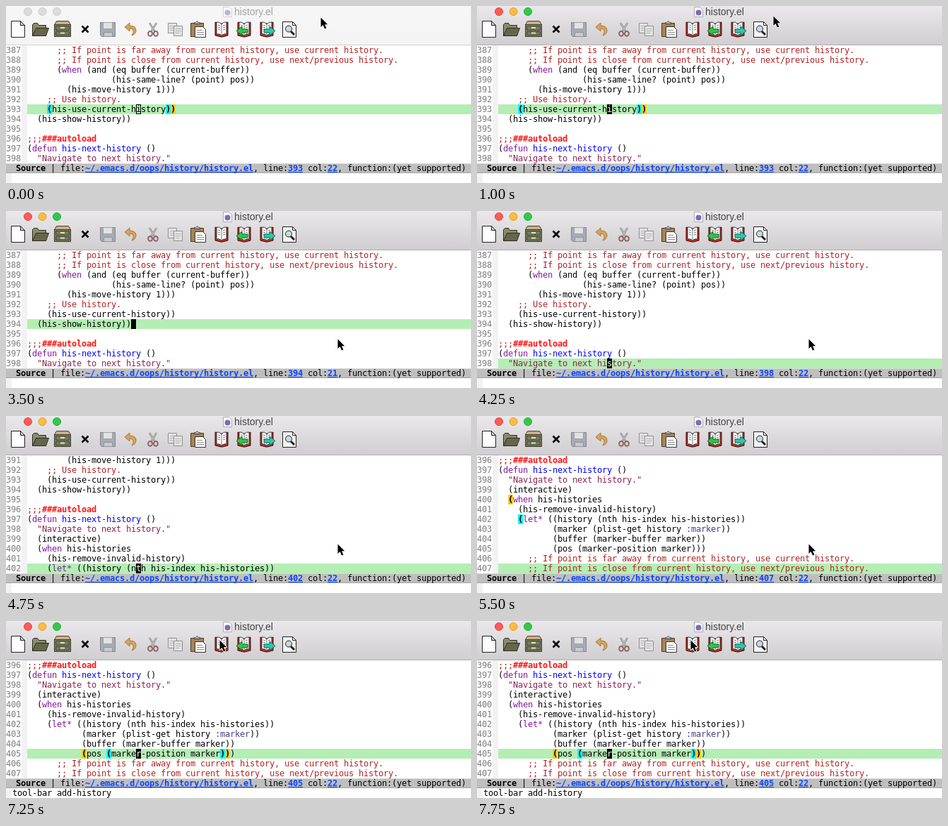
An HTML page with a canvas for the animation above (8000 ms loop, 658 by 252 pixels).

```html
<!DOCTYPE html>
<html lang="en">
<head>
<meta charset="utf-8">
<title>history.el</title>
<style>
html, body { margin: 0; width: 100%; height: 100%; overflow: hidden; background: #fff; }
canvas { display: block; }
</style>
</head>
<body>
<canvas id="stage" width="658" height="252"></canvas>
<script>
const c = document.getElementById('stage').getContext('2d');
const STEP = 250, LOOP = 8000, CELL = 7, ROW = 14, TOP = 56, LEFT = 30, ROWS = 12;
const MONO = '"DejaVu Sans Mono", monospace';
const CYAN = '#00ffff', GOLD = '#ffcc1a', GREEN = '#b4eeb4';

const far = '      ;; If point is far away from current history, use current history.';
const near = '      ;; If point is close from current history, use next/previous history.';
const FIRST = 387;
const code = [
  far, near,
  '      (when (and (eq buffer (current-buffer))',
  '                 (his-same-line? (point) pos))',
  '        (his-move-history 1)))',
  '    ;; Use history.',
  '    (his-use-current-history))',
  '  (his-show-history))',
  '',
  ';;;###autoload',
  '(defun his-next-history ()',
  '  "Navigate to next history."',
  '  (interactive)',
  '  (when his-histories',
  '    (his-remove-invalid-history)',
  '    (let* ((history (nth his-index his-histories))',
  '           (marker (plist-get history :marker))',
  '           (buffer (marker-buffer marker))',
  '           (pos (marker-position marker)))',
  far, near
];

// Syntax rules: pattern, colour, bold
const rules = [
  [/###autoload/g, '#ff1414', true],
  [/;;;|;; .*/g, '#b22222'],
  [/".*"/g, '#8b2252'],
  [/defun|when|let\*/g, '#86189c'],
  [/his-next-history/g, '#0000ff'],
  [/:marker/g, '#483d8b']
];

// Keyed by step number; each value holds until the next key
const mouse = { 0: [445, 16], 1: [431, 21], 2: [419, 14], 5: [404, 18], 6: [366, 29],
  7: [318, 39], 8: [295, 40], 11: [386, 112], 12: [469, 182], 26: [430, 148],
  27: [345, 66], 28: [302, 27] };
const point = { 0: 393, 14: 394, 15: 395, 16: 396, 17: 398, 18: 400, 19: 402,
  20: 404, 21: 406, 22: 407, 24: 406, 25: 405 };
const parens = {
  0: [[393, 4, CYAN], [393, 28, CYAN], [393, 29, GOLD]],
  14: [],
  22: [[400, 2, GOLD], [402, 4, CYAN]],
  25: [[405, 11, GOLD], [405, 16, CYAN], [405, 39, CYAN], [405, 40, GOLD]]
};
const at = (keys, k) => keys[Math.max(...Object.keys(keys).filter(n => n <= k))];

function rect(x, y, w, h, fill) {
  c.fillStyle = fill;
  c.fillRect(x, y, w, h);
}

function text(s, x, y, color, bold) {
  c.font = (bold ? 'bold ' : '') + '12px ' + MONO;
  c.fillStyle = color;
  [...s].forEach((ch, i) => c.fillText(ch, x + i * CELL, y));
}

function shape(d, fill, stroke, width = 1) {
  const p = new Path2D(d);
  if (fill) { c.fillStyle = fill; c.fill(p); }
  if (stroke) { c.strokeStyle = stroke; c.lineWidth = width; c.stroke(p); }
}

function disc(x, y, r, fill, stroke) {
  c.beginPath();
  c.arc(x, y, r, 0, 7);
  c.fillStyle = fill;
  c.fill();
  if (stroke) { c.strokeStyle = stroke; c.lineWidth = 1; c.stroke(); }
}

function book() {
  shape('M-9-10L-1-8L1-8L9-10V9L1 11H-1L-9 9Z', '#c92b22', '#3a0b08');
  shape('M-7-10Q-3-11 0-7Q3-11 7-10V7Q3 6 0 9Q-3 6-7 7Z', '#fff', '#333');
  shape('M0-7V9M-5-6L-2-5M-5-3L-2-2M-5 0L-2 1M5-6L2-5M5-3L2-2M5 0L2 1', null, '#777');
}

// Toolbar drawings, each centred on its own origin
const icons = [
  [17, () => {
    shape('M-9.5-11.5H3.5L9.5-5.5V11.5H-9.5Z', '#fdfdfd', '#222');
    shape('M3.5-11.5V-5.5H9.5Z', '#ccc', '#222');
  }],
  [48, () => {
    shape('M-10.5 9.5V-6.5L-8.5-8.5H-3.5L-1.5-5.5H8.5V9.5Z', '#8b8a6b', '#2e2d20');
    shape('M-10.5 9.5L-5.5-1.5H12.5L8.5 9.5Z', '#66664d', '#2e2d20');
  }],
  [80, () => {
    shape('M-11.5-6.5L-8.5-11.5H8.5L11.5-6.5Z', '#c9b08b', '#4a3c28');
    shape('M-11.5-6.5H11.5V10.5H-11.5Z', '#8a8a6c', '#37372a');
    shape('M-9.5-4.5H9.5V1.5H-9.5ZM-9.5 3.5H9.5V8.5H-9.5Z', '#717a5d', '#41452f');
    shape('M-3-2H3M-3 5.5H3', null, '#e6dfb8', 2);
  }],
  [112, () => shape('M-4.5-4.5L4.5 4.5M4.5-4.5L-4.5 4.5', null, '#000', 2.6)],
  [144, () => {
    shape('M-10.5-9.5H10.5V10.5H-8.5L-10.5 8.5Z', '#a6abb6', '#85878d');
    shape('M-6.5-9.5H6.5V-.5H-6.5Z', '#e2e2e4', '#a0a0a4');
    shape('M-5.5 4.5H6.5V10.5H-5.5Z', '#c9cacd', '#909298');
  }],
  [176, () => shape('M-8-3L-1-9V-5Q8-5 8 2Q8 7 2 9Q5 5 4 2Q3-1-1-1V3Z', '#d5a361', '#a67839')],
  [208, () => {
    shape('M-5-9L3 4M5-9L-3 4', null, '#858585', 2.4);
    shape('M-5-9L3 4M5-9L-3 4', null, '#d2d2d2');
    shape('M-4 3A3 3.4 0 1 0-3.9 3M4 3A3 3.4 0 1 1 3.9 3', null, '#8d6262', 2);
  }],
  [240, () => {
    for (const [x, y] of [[-10.5, -8.5], [-2.5, -4.5]]) {
      shape(`M${x} ${y}h12v14h-12z`, '#e4e4e4', '#909090');
      shape(`M${x + 2} ${y + 4}h8m-8 3h8m-8 3h6`, null, '#b2b2b2');
    }
  }],
  [272, () => {
    shape('M-10.5-8.5H7.5V10.5H-10.5Z', '#a88355', '#493822');
    shape('M-5.5-7.5V-9.5H-3.5L-1.5-11.5L.5-9.5H2.5V-7.5Z', '#bbb', '#444');
    shape('M-4.5-3.5H6.5L10.5 .5V11.5H-4.5Z', '#fff', '#333');
    shape('M-2 1.5H6M-2 4.5H8M-2 7.5H8', null, '#888');
  }],
  [305, book],
  [337, () => {
    book();
    shape('M-11 2.5L-3-4V0H5V5H-3V9Z', '#2fc54a', '#0c6420');
  }],
  [369, () => {
    book();
    shape('M12 2.5L4-4V0H-4V5H4V9Z', '#2fc8a8', '#0a655d');
  }],
  [401, () => {
    shape('M-9.5-10.5H4.5L9.5-5.5V11.5H-9.5Z', '#f4f4f4', '#222');
    shape('M4.5-10.5V-5.5H9.5', null, '#222');
    shape('M2 3L7 8', null, '#222', 3);
    disc(-1, -.5, 4.5, '#c8d8df', '#222');
  }]
];

function header(active) {
  const g = c.createLinearGradient(0, 0, 0, 55);
  g.addColorStop(0, active ? '#eae8ea' : '#f6f6f6');
  g.addColorStop(1, active ? '#d0ced0' : '#f4f4f4');
  rect(0, 0, 658, 55, g);
  rect(0, 55, 658, 1, active ? '#b0aeb0' : '#d2d2d2');

  const lights = active
    ? [['#fc5b57', '#df4744'], ['#fdbc40', '#de9f34'], ['#34c84a', '#27aa35']]
    : Array(3).fill(['#dcdcdc', '#cbcbcb']);
  lights.forEach(([fill, edge], i) => disc(31 + i * 20.5, 8, 5.5, fill, edge));

  c.globalAlpha = active ? 1 : .5;
  shape('M307.5 1.5H315.5L319.5 5.5V15.5H307.5Z', '#fff', '#aaa');
  disc(313.5, 9.5, 4, '#7d6bb8');
  c.globalAlpha = 1;
  c.font = '14px "Liberation Sans", Arial, sans-serif';
  c.fillStyle = active ? '#444' : '#a2a2a2';
  c.fillText('history.el', 323, 13);

  for (const [x, draw] of icons) {
    c.save();
    c.translate(x, 33);
    draw();
    c.restore();
  }
}

function codeLine(s, y) {
  const colors = Array(s.length).fill('#000'), bold = [];
  for (const [re, color, heavy] of rules)
    for (const m of s.matchAll(re))
      for (let i = m.index; i < m.index + m[0].length; i++) {
        if (colors[i] !== '#000') continue;
        colors[i] = color;
        bold[i] = heavy;
      }
  [...s].forEach((ch, i) => text(ch, LEFT + i * CELL, y, colors[i], bold[i]));
}

function editor(k, line, col, active) {
  const top = line >= 399 || k >= 18 ? Math.max(FIRST, at(point, Math.min(k, 22)) - ROWS + 1) : FIRST;
  const rowY = n => TOP + (n - top) * ROW;
  rect(0, TOP, 658, ROWS * ROW, '#fff');
  rect(22, TOP, 8, ROWS * ROW, '#f2f2f2');
  rect(LEFT, rowY(line), 658 - LEFT, ROW, GREEN);
  for (let n = top; n < top + ROWS; n++) {
    text(String(n), 0, rowY(n) + 11, '#808080');
    codeLine(code[n - FIRST], rowY(n) + 11);
  }
  for (const [n, i, color] of at(parens, k)) {
    rect(LEFT + i * CELL, rowY(n), CELL, ROW, color);
    text(code[n - FIRST][i], LEFT + i * CELL, rowY(n) + 11, '#000', true);
  }
  if (k === 22 || k === 23) return;
  const x = LEFT + col * CELL, y = rowY(line);
  if (active) {
    rect(x, y, CELL, ROW, '#000');
    text(code[line - FIRST][col] || '', x, y + 11, '#fff');
  } else {
    c.strokeStyle = '#000';
    c.lineWidth = 1;
    c.strokeRect(x + .5, y + .5, CELL - 1, ROW - 1);
  }
}

function modeLine(line, col) {
  rect(0, 224, 658, ROW, '#bfbfbf');
  rect(0, 224, 658, 1, '#d6d6d6');
  rect(0, 237, 658, 1, '#a4a4a4');
  let x = 14;
  const put = (s, bold, link) => {
    text(String(s), x, 235, link ? '#0a45ff' : '#000', bold || link);
    const w = String(s).length * CELL;
    if (link) rect(x, 236, w, 1, '#0a45ff');
    x += w;
  };
  put('Source', true);
  put(' | file:');
  put('~/.emacs.d/oops/history/history.el', false, true);
  put(', line:');
  put(line, false, true);
  put(' col:');
  put(col, false, true);
  put(', function:(yet supported)');
}

function pointer([x, y]) {
  c.save();
  c.translate(x, y);
  c.lineJoin = 'round';
  shape('M.5 .5V14L3.6 11L6 16.5L8.4 15.5L6 10.2H10.2Z', '#000', '#fff', 1.6);
  shape('M.5 .5V14L3.6 11L6 16.5L8.4 15.5L6 10.2H10.2Z', '#000');
  c.restore();
}

function draw() {
  const k = Math.floor(performance.now() % LOOP / STEP);
  const active = k >= 4;
  const line = at(point, k);
  const col = Math.min(22, code[line - FIRST].length);
  header(active);
  editor(k, line, col, active);
  modeLine(line, col);
  rect(0, 238, 658, ROW, '#fff');
  rect(0, 238, 8, ROW, '#f2f2f2');
  if (k >= 9 && k < 14 || k >= 29) text('tool-bar add-history', 9, 249, '#000');
  pointer(at(mouse, k));
  requestAnimationFrame(draw);
}
draw();
</script>
</body>
</html>
```
